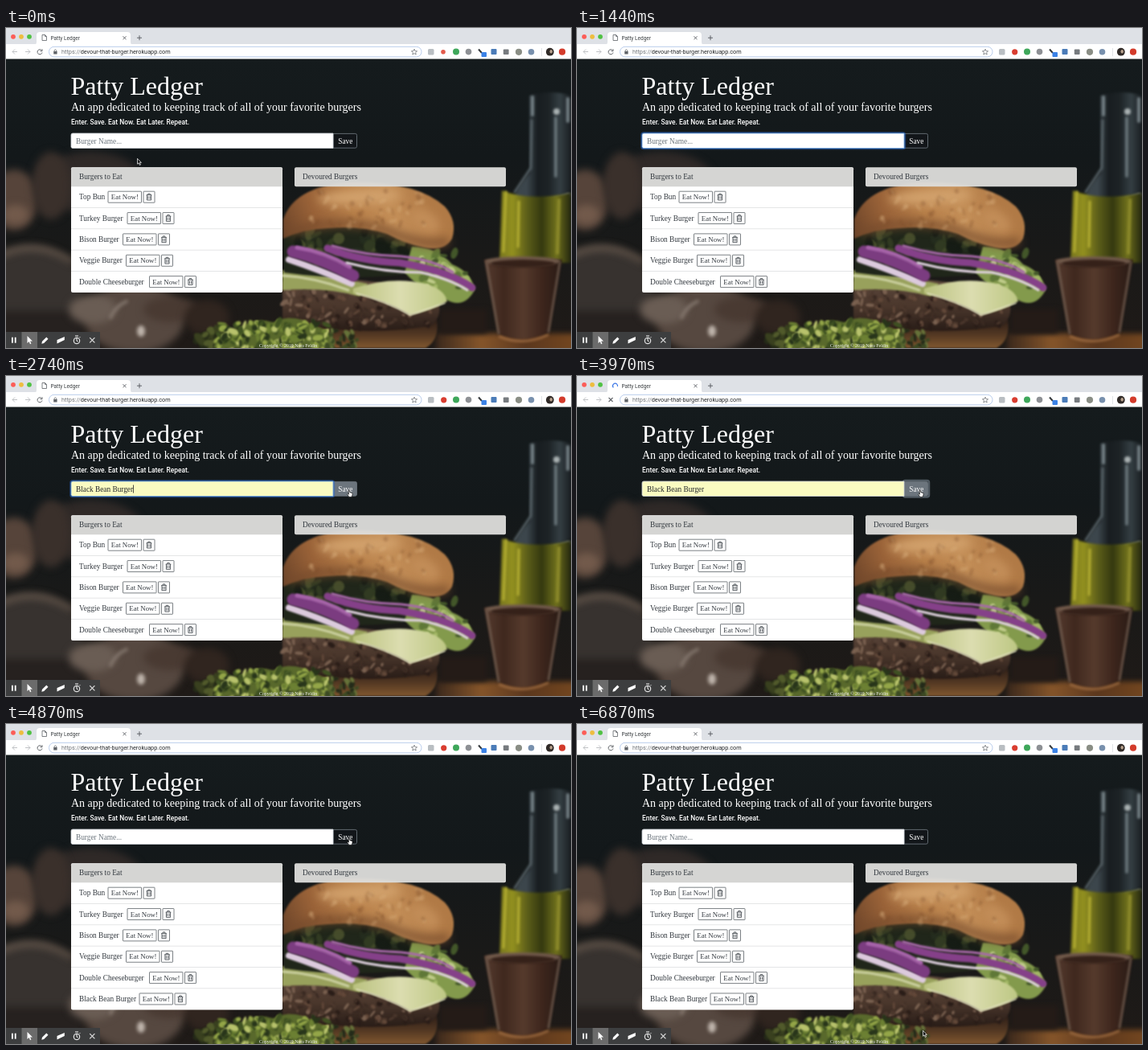
Animation, 703 px wide and 398 px high, one loop 7.02 s. Source, as an HTML page with a canvas:

```html
<!DOCTYPE html>
<html lang="en">
<head>
<meta charset="utf-8">
<title>Patty Ledger</title>
<style>
  html, body { margin: 0; width: 100%; height: 100%; overflow: hidden; background: #14191c; }
  canvas { display: block; }
</style>
</head>
<body>
<canvas id="stage" width="703" height="398"></canvas>
<script>
const W = 703, H = 398, LOOP = 7020;
const SERIF = '"Liberation Serif", serif', SANS = 'Roboto, sans-serif';
let c = document.getElementById('stage').getContext('2d');

// time, x, y, shape of the pointer
const POINTER = [
  [0, 163, 162, 'arrow'], [550, 162, 157, 'arrow'], [700, 158, 142, 'beam'], [1150, 0, 0, ''],
  [1720, 146, 159, 'arrow'], [2150, 280, 171, 'arrow'], [2300, 394, 174, 'arrow'],
  [2580, 412, 160, 'arrow'], [2740, 425, 142, 'hand'], [5080, 440, 150, 'arrow'],
  [5240, 492, 168, 'arrow'], [5400, 560, 187, 'arrow'], [5550, 622, 201, 'arrow'],
  [5710, 664, 207, 'arrow'], [5870, 682, 208, 'arrow'], [6010, 610, 252, 'arrow'],
  [6160, 511, 302, 'arrow'], [6430, 497, 322, 'arrow'], [6570, 475, 345, 'arrow'],
  [6720, 450, 367, 'arrow'], [6870, 430, 381, 'arrow']
];
const BURGERS = [
  ['Top Bun', 127], ['Turkey Burger', 151], ['Bison Burger', 145.5],
  ['Veggie Burger', 149.5], ['Double Cheeseburger', 178.5], ['Black Bean Burger', 166]
];

function rect(x, y, w, h, fill) { c.fillStyle = fill; c.fillRect(x, y, w, h); }
function box(x, y, w, h, r, fill, line, width = 1) {
  c.beginPath();
  c.roundRect(x, y, w, h, r);
  if (fill) { c.fillStyle = fill; c.fill(); }
  if (line) { c.strokeStyle = line; c.lineWidth = width; c.stroke(); }
}
function text(s, x, y, size, color, family = SERIF, weight = 400) {
  c.font = `${weight} ${size}px ${family}`;
  c.fillStyle = color;
  c.fillText(s, x, y);
  return c.measureText(s).width;
}
function oval(x, y, rx, ry, fill, turn = 0) {
  c.beginPath();
  c.ellipse(x, y, rx, ry, turn, 0, 7);
  c.fillStyle = fill;
  c.fill();
}
function path(d, fill, line, width = 1) {
  const p = new Path2D(d);
  if (fill) { c.fillStyle = fill; c.fill(p); }
  if (line) { c.strokeStyle = line; c.lineWidth = width; c.stroke(p); }
}
function ramp(x0, y0, x1, y1, ...colors) {
  const g = c.createLinearGradient(x0, y0, x1, y1);
  colors.forEach((color, i) => g.addColorStop(i / (colors.length - 1), color));
  return g;
}
function seeded(seed) {
  return () => (seed = (seed * 16807) % 2147483647) / 2147483647;
}
function scatter(n, random, x, y, w, h, size, colors) {
  for (let i = 0; i < n; i++) {
    oval(x + w * random(), y + h * random(), size * (.5 + random()), size * (.3 + random() * .5),
      colors[i % colors.length], random() * 3);
  }
}

function paintScene() {
  const layer = document.createElement('canvas');
  layer.width = W; layer.height = H;
  const screen = c, random = seeded(41);
  c = layer.getContext('2d');
  c.lineCap = 'round';
  rect(0, 0, W, H, ramp(0, 38, 0, H, '#151b1d', '#13181a', '#191918', '#1f1a17'));

  // soft crockery on the left
  c.filter = 'blur(5px)';
  oval(105, 192, 66, 38, '#2f2927');
  oval(10, 214, 30, 38, '#56443a');
  oval(56, 196, 24, 42, '#3a302b');
  oval(28, 324, 66, 54, '#37322f');
  path('M-5 282 Q38 262 82 290', null, '#6b5c50', 6);
  oval(12, 232, 16, 12, '#725a4b');
  rect(-10, 352, 110, 56, '#26211f');
  oval(160, 362, 62, 42, '#564840');
  oval(108, 350, 30, 18, '#6a5d54');
  oval(205, 350, 34, 16, '#493a32');
  oval(250, 360, 28, 22, '#30251f');
  c.filter = 'blur(2px)';
  oval(168, 377, 5, 7, '#bdb3aa');
  path('M130 360 Q136 346 150 340', null, '#84776e', 4);

  // bottle, oil and glass on the right, standing on wood
  c.filter = 'blur(3px)';
  rect(535, 380, 180, 30, ramp(535, 0, 703, 0, '#3a281c', '#85552a', '#5b371d', '#71451f'));
  rect(540, 350, 58, 30, '#241b17');
  c.filter = 'blur(1.5px)';
  path('M651 84 Q678 76 703 84 V200 L690 216 H630 Q634 202 652 180 Z',
    ramp(648, 0, 703, 0, '#3c464c', '#181d20', '#1d2326', '#343e43', '#191e21'));
  path('M655 86 V108 M699 88 V116', null, '#737f84', 4);
  path('M654 115 L653 174 L633 204', null, '#566166', 3);
  path('M684 112 V184', null, '#667277', 4);
  oval(685, 104, 4, 4, '#a9b1b2');
  path('M632 212 Q665 222 700 207', null, '#8c958e', 4);
  path('M617 202 Q650 216 703 205 V292 H614 Z',
    ramp(612, 0, 703, 0, '#77751e', '#92901f', '#5c5e19', '#34380f', '#6f701c', '#23270f'));
  path('M622 204 L619 278 M638 216 L637 272', null, '#b5af32', 3);
  path('M688 214 L686 280', null, '#8d8b2b', 4);
  path('M595 288 H692 L676 378 Q643 396 612 380 Z', ramp(595, 0, 692, 0, '#553b2f', '#3f281e', '#553a2c', '#3c251c', '#281a15'));
  oval(643, 290, 47, 6, '#715a4b');
  oval(643, 293, 40, 5, '#352119');
  path('M598 292 L613 380 M689 292 L675 378', null, '#776456', 2);
  path('M614 384 Q643 396 674 382', null, '#94643c', 3);

  // burger, from the bottom up
  c.filter = 'blur(1px)';
  path('M366 362 H536 Q540 388 522 398 H380 Z', ramp(0, 362, 0, 398, '#2c1e18', '#503622', '#80572f'));
  path('M344 316 Q420 302 530 330 Q549 350 530 370 Q440 386 344 364 Z', ramp(0, 315, 0, 378, '#5b463a', '#4a372c', '#271b16'));
  scatter(130, random, 346, 322, 182, 50, 4, ['#7a6150', '#2a1d18', '#624839', '#3a2a22', '#4c382d']);
  path('M344 301 Q390 306 450 318 L440 334 Q400 322 344 326 Z', '#98a15c');
  path('M344 308 Q384 310 426 326', null, '#cbd0a0', 3);

  // leaves and pickles behind the onion
  path('M346 254 Q425 226 520 262 L540 300 Q442 318 346 304 Z', '#20261a');
  scatter(46, random, 362, 252, 140, 40, 9, ['#313a22', '#161c15', '#454c2b', '#242c1e']);
  path('M505 272 Q536 272 555 294 Q580 304 583 326 Q570 350 548 338 Q520 330 496 304 Z', '#839a4c');
  scatter(30, random, 515, 280, 58, 46, 6, ['#a5b968', '#5f7838', '#c0cc8a', '#43572a']);

  // onion rings
  path('M352 288 Q388 300 430 318', null, '#dccadd', 8);
  path('M357 278 Q392 286 432 308', null, '#7b3c80', 15);
  path('M362 273 Q396 278 428 297', null, '#a663a9', 5);
  path('M400 274 Q440 290 490 292 Q550 302 580 323', null, '#854089', 9);
  path('M406 271 Q446 283 492 284 Q532 288 556 304', null, '#a868aa', 3);
  path('M424 292 Q470 304 516 304 Q552 312 574 326', null, '#e1d3e1', 3);

  path('M432 324 Q480 308 522 318 Q546 325 549 340 Q528 352 503 357 Q470 338 432 330 Z',
    ramp(432, 0, 549, 0, '#b9c17e', '#dcddb0', '#bdc783'));
  path('M436 330 Q474 340 503 357 L546 342', null, '#e5e4c4', 1.5);

  // top bun
  path('M345 238 Q358 198 425 192 Q512 190 546 222 Q562 240 555 262 Q546 278 520 273 Q496 268 474 256 Q440 245 400 249 Q370 250 345 262 Z',
    ramp(345, 262, 520, 198, '#6c4429', '#996238', '#b8804a', '#c48f58', '#b17a46'));
  c.filter = 'blur(6px)';
  oval(440, 210, 52, 9, '#d2a26d', -.05);
  oval(522, 240, 20, 12, '#c28d58', .6);
  path('M356 254 Q420 232 480 254 Q520 272 548 266', null, '#744a2c', 8);
  c.filter = 'blur(1.5px)';
  scatter(50, random, 378, 202, 146, 46, 4, ['rgba(226,188,135,.28)', 'rgba(116,68,36,.28)']);

  // lettuce
  c.filter = 'blur(1px)';
  scatter(30, random, 235, 374, 60, 28, 8, ['#39401f', '#252a18', '#515a2b']);
  path('M258 398 Q266 371 291 376 Q304 358 332 366 Q358 354 380 369 Q410 376 408 398 Z', '#59692c');
  scatter(150, random, 262, 366, 138, 36, 5, ['#94a648', '#3f5122', '#b8c26c', '#6c8033', '#28351a']);
  scatter(25, random, 400, 374, 40, 26, 5, ['#3c4a24', '#242b19', '#66733a']);
  c.filter = 'none';
  c = screen;
  return layer;
}

function arrowKey(x, dir, color) {
  path(`M${x + 3 * dir} 29.5 H${x - 3 * dir} M${x} 26.5 L${x - 3 * dir} 29.5 L${x} 32.5`, null, color, .9);
}

function drawBrowser(t) {
  const loading = t >= 3340 && t < 4560;
  rect(0, 0, W, 21, '#dee1e6');
  ['#fc5d57', '#eebd3e', '#4fc143'].forEach((color, i) => oval(9 + 10 * i, 10.8, 2.9, 2.9, color));
  path('M35 21 Q38 21 38 17 V9 Q38 5 42 5 H151 Q155 5 155 9 V17 Q155 21 158 21 Z', '#fff');
  if (loading) {
    c.beginPath();
    const a = Math.floor(t / 155) * 1.1;
    c.arc(47.5, 12.2, 3, a, a + 4.2);
    c.strokeStyle = '#3d78e7'; c.lineWidth = 1.2; c.stroke();
  } else {
    path('M45 8.5 H48.5 L50.5 10.5 V15.5 H45 Z M48.5 8.5 V10.5 H50.5', '#fff', '#5f6368', .8);
  }
  text('Patty Ledger', 55.5, 14.5, 6.5, '#3c4043', SANS);
  path('M145.5 10.3 L149.5 14.3 M149.5 10.3 L145.5 14.3 M163 12.2 H169 M166 9.2 V15.2', null, '#55595e', .9);

  rect(0, 20, W, 18.5, '#fff');
  arrowKey(11, 1, '#b9bcbf');
  arrowKey(27, -1, '#b9bcbf');
  if (loading) {
    path('M39.5 27 L44.5 32 M44.5 27 L39.5 32', null, '#5f6368', 1.1);
  } else {
    path('M44.5 28 A3 3 0 1 0 45 30.5 M45 26.3 V28.7 H42.6', null, '#62666a', 1);
  }
  box(53.5, 23.3, 463.5, 12.6, 6.3, '#fff', '#b9cdec', 1);
  box(59.2, 29, 4.4, 3.6, .5, '#5f6368');
  path('M60 29 V28 Q61.4 25.5 62.8 28 V29', null, '#5f6368', .8);
  const scheme = text('https://', 69, 32, 7.3, '#6f7378', SANS);
  text('devour-that-burger.herokuapp.com', 69 + scheme, 32, 7.3, '#24272a', SANS);
  path('M508 26.2 L509 28.6 L511.6 28.8 L509.6 30.5 L510.2 33 L508 31.6 L505.8 33 L506.4 30.5 L504.4 28.8 L507 28.6 Z', null, '#62666a', .7);

  box(525, 26, 7.5, 7.5, 1.5, '#b9bec2');
  if (t < 250) oval(544, 29.7, 2.8, 2.8, '#e35a4b');
  else oval(544.7, 29.8, 3.6, 3.6, '#d93d30');
  oval(560, 29.6, 4, 4, '#3ea75a');
  oval(575.5, 29.6, 3.8, 3.8, '#8d9094');
  path('M588 26.5 L592 31', null, '#34383c', 2);
  box(591.5, 30, 6.5, 6, 1, '#3b82e6');
  box(603.5, 26, 7, 7, 1, '#4b7cb8');
  box(618.8, 26.4, 6.8, 6.5, 1, '#777b7f');
  oval(638, 29.8, 4.1, 4.1, '#8a8e85');
  oval(653.5, 29.7, 3.8, 3.8, '#7890ad');
  rect(666, 25, .7, 10, '#d5d8dc');
  oval(676.8, 29.7, 4.9, 4.9, '#302a27');
  oval(678.2, 29.2, 1.7, 2.2, '#b9a38f');
  oval(692, 29.7, 4.1, 4.1, '#d33b2b');
}

function drawForm(t) {
  const focused = t >= 850 && t < 3340;
  const filled = t >= 1720 && t < 4330;
  const hover = t >= 2740 && t < 4330;
  const pressed = t >= 3340 && t < 4330;
  if (pressed) box(406, 130, 32, 20.5, 2.5, null, 'rgba(130,144,157,.55)', 2.5);
  box(407, 131.4, 29.5, 17.8, [0, 2, 2, 0], hover ? '#6c757d' : 'rgba(18,22,25,.7)', '#69727a', .9);
  if (focused) box(80.2, 130.2, 328, 20, 2.5, null, t < 1000 ? 'rgba(0,123,255,.2)' : 'rgba(40,105,205,.5)', 2);
  box(81, 131, 326, 18.5, [2, 0, 0, 2], filled ? '#fafbc1' : '#fff', focused ? '#6fa5e2' : '#ced4da', .8);
  if (filled) text('Black Bean Burger', 87, 143.5, 9.3, '#24282c');
  else if (t >= 1580 && t < 1720) text('B', 87, 143.5, 9.3, '#24282c');
  else text('Burger Name...', 87, 143.5, 9.3, '#6c757d');

  const caretX = filled ? 158 : t >= 1580 ? 94 : 87;
  if (focused && (t < 1150 || (t >= 1580 && t < 2150) || t >= 2580)) rect(caretX, 135.5, .8, 10, '#222');
  text('Save', 413.3, 143.6, 9.3, '#fff');
  if (t >= 1580 && t < 1870) {
    box(81.5, 150, 325, 18.5, 1, '#fff', '#c6c9cc', .7);
    if (t >= 1720) rect(82, 153, 324, 12, '#e8eaed');
    text('Black Bean Burger', 87, 162, 7, '#222', SANS);
  }
}

function drawTrash(x, y) {
  path(`M${x - 3.3} ${y - 2.5} H${x + 3.3} M${x - 1.3} ${y - 2.7} V${y - 4} H${x + 1.3} V${y - 2.7}
    M${x - 2.6} ${y - 2.5} V${y + 3.8} H${x + 2.6} V${y - 2.5}
    M${x - 1.1} ${y - 1} V${y + 2.5} M${x + 1.1} ${y - 1} V${y + 2.5}`, null, '#343a40', .8);
}

function drawLists(count) {
  box(81, 173.3, 263, 24 + 26.35 * count, 2, '#fff');
  box(81, 173.3, 263, 24, [2, 2, 0, 0], '#d5d5d3');
  box(359, 173.3, 263, 24, 2, 'rgba(222,222,220,.95)');
  text('Burgers to Eat', 91, 188.3, 9.3, '#343a40');
  text('Devoured Burgers', 369, 188.3, 9.3, '#343a40');
  BURGERS.slice(0, count).forEach(([name, x], i) => {
    const y = 210.2 + 26.35 * i;
    if (i) rect(81, y - 13.5, 263, .8, '#dedfe0');
    text(name, 91, y + 3, 9.3, '#343a40');
    box(x, y - 7, 41.5, 14, .5, '#fff', '#5b6166', .8);
    text('Eat Now!', x + 3.8, y + 3, 8.85, '#343a40');
    box(x + 44, y - 7, 14, 14, .5, '#fff', '#5b6166', .8);
    drawTrash(x + 51, y);
  });
}

function drawRecorder() {
  rect(0, 378, 117, 20, '#3d3e3f');
  rect(19.5, 378, 19.5, 20, '#6b6b6b');
  rect(7, 384.7, 1.8, 7, '#fff');
  rect(10.8, 384.7, 1.8, 7, '#fff');
  path('M26.5 383 V392 L28.7 390 L30 393.2 L31.4 392.5 L30 389.5 H33 Z', '#fff');
  path('M44.3 392.7 L45 389.8 L50.3 384.5 L52.5 386.7 L47.2 392 Z', '#fff');
  path('M63.5 388 L72.8 384 V388 L63.5 392.5 Z', '#fff');
  path('M86 383 H90 M88 385 V389 L89.5 390 M91.3 385.2 L92.3 384.2', null, '#fff', 1);
  c.beginPath(); c.arc(88, 389, 3.8, 0, 7); c.stroke();
  path('M104.2 385.2 L110.4 391.4 M110.4 385.2 L104.2 391.4', null, '#ddd', 1.2);
}

function drawPointer(t) {
  const [, x, y, shape] = POINTER.findLast(p => p[0] <= t);
  c.save();
  c.translate(x, y);
  c.lineJoin = 'round';
  if (shape === 'arrow') path('M.5 .3 V7.2 L2.1 5.8 L3.3 8.5 L4.5 8 L3.3 5.4 H5.4 Z', '#111', '#fff', .7);
  if (shape === 'beam') path('M-1.5 -4 Q0 -4 0 -3 V4 Q0 5 -1.5 5 M1.5 -4 Q0 -4 0 -3 M0 4 Q0 5 1.5 5', null, '#222', .8);
  if (shape === 'hand') path('M1 .4 Q2 -.4 2.5 .8 L3 3 Q4.2 2.3 4.6 3.4 Q6 3 6 4.6 V6 L5 8.4 H1.8 L-.3 5.3 Q.2 4.2 1.5 5.2 Z', '#fff', '#111', .7);
  c.restore();
}

const scene = paintScene();

function frame(now) {
  const t = now % LOOP;
  c.drawImage(scene, 0, 0);
  drawBrowser(t);
  text('Patty Ledger', 80.5, 82.5, 32, '#fff');
  text('An app dedicated to keeping track of all of your favorite burgers', 81, 102.5, 14, '#fff');
  text('Enter. Save. Eat Now. Eat Later. Repeat.', 81, 119.5, 8.42, '#fff', SANS, 500);
  drawLists(t < 4330 ? 5 : 6);
  drawForm(t);
  text('Copyright © 2019 Nora Feldin', 315, 397, 5.85, '#eee');
  if (t < 4330 || t >= 4560) drawRecorder();
  drawPointer(t);
  requestAnimationFrame(frame);
}
requestAnimationFrame(frame);
</script>
</body>
</html>
```
